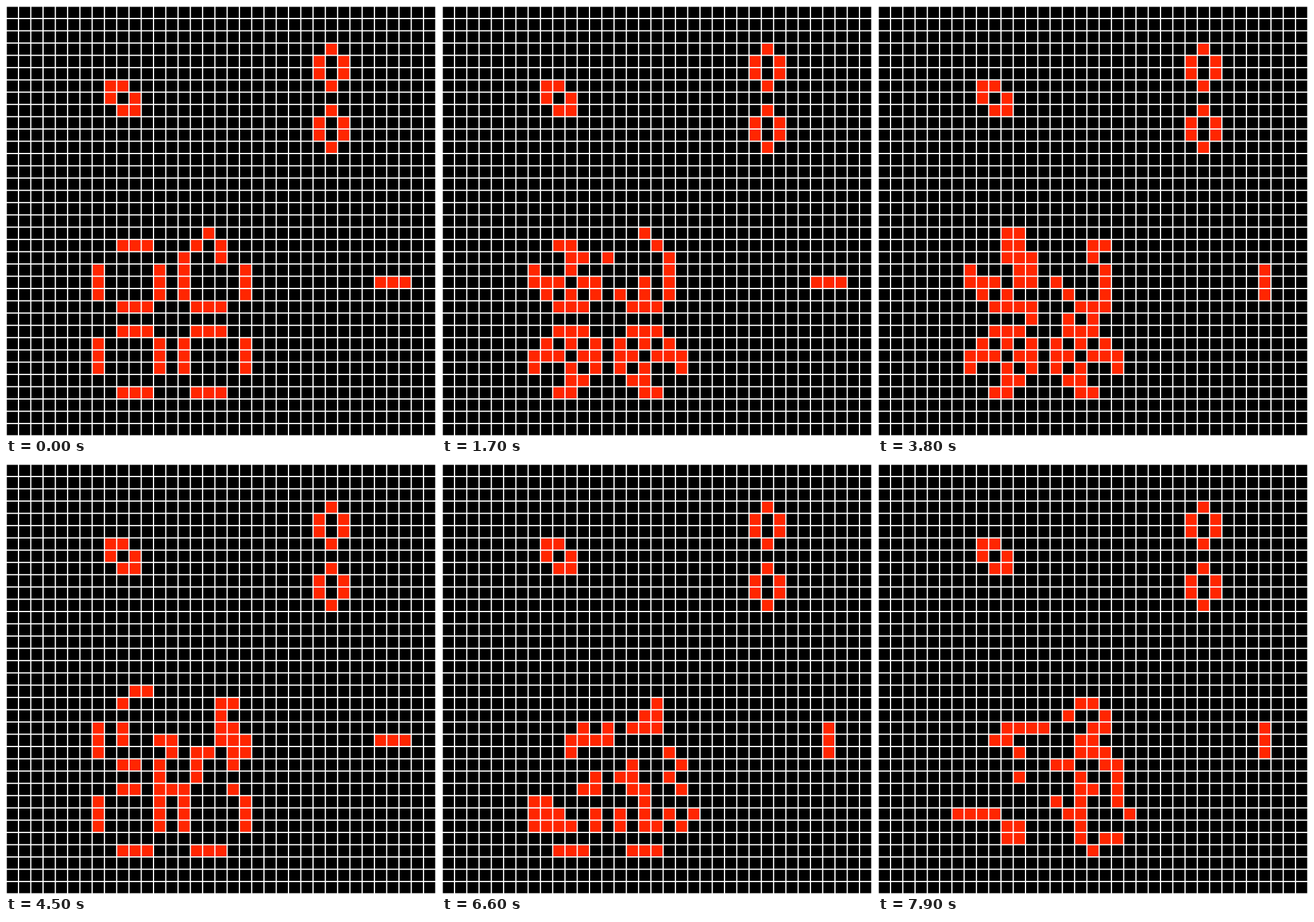
An HTML page with a canvas that plays this animation: 720x720 px, repeating every 8 s.

```html
<!DOCTYPE html>
<html>
<head>
<meta charset="utf-8">
<title>Game of Life</title>
<style>
html, body { margin: 0; width: 100%; height: 100%; overflow: hidden; background: #000; }
canvas { display: block; }
</style>
</head>
<body>
<canvas id="stage" width="720" height="720"></canvas>
<script>
const N = 35, PITCH = 20.55, EDGE = 0.4;
const LOOP = 8000, STEP = 680, LEAD = 160;
const ctx = document.getElementById('stage').getContext('2d');

const emptyGrid = () => Array.from({ length: N }, () => new Uint8Array(N));

function place(grid, col, row, pattern) {
  pattern.split('/').forEach((line, y) =>
    [...line].forEach((c, x) => { if (c === 'O') grid[row + y][col + x] = 1; }));
}

function next(grid) {
  const out = emptyGrid();
  for (let y = 0; y < N; y++) {
    for (let x = 0; x < N; x++) {
      let count = -grid[y][x];
      for (let dy = -1; dy <= 1; dy++)
        for (let dx = -1; dx <= 1; dx++)
          count += grid[(y + dy + N) % N][(x + dx + N) % N];
      out[y][x] = count === 3 || (count === 2 && grid[y][x]) ? 1 : 0;
    }
  }
  return out;
}

const beehive = '.O./O.O/O.O/.O.';
const bars = 'O....O.O....O', caps = '..OOO...OOO..';
const start = emptyGrid();
place(start, 8, 6, 'OO./O.O/.OO');
place(start, 25, 3, beehive);
place(start, 25, 8, beehive);
place(start, 30, 22, 'OOO');
// A pulsar whose upper right arm has been disturbed
place(start, 7, 18, [
  '.........O...', '..OOO...O.O..', '.......O..O..',
  bars, bars, bars, caps, '', caps, bars, bars, bars, '', caps
].join('/'));

const generations = [start];
while (generations.length <= (LOOP + LEAD) / STEP)
  generations.push(next(generations[generations.length - 1]));

const at = i => EDGE + i * PITCH;

function draw(grid) {
  ctx.fillStyle = '#000';
  ctx.fillRect(0, 0, 720, 720);
  ctx.fillStyle = '#ff2600';
  grid.forEach((line, y) => line.forEach((alive, x) => {
    if (alive) ctx.fillRect(at(x), at(y), PITCH, PITCH);
  }));
  ctx.fillStyle = '#fff';
  for (let i = 0; i <= N; i++) {
    ctx.fillRect(at(i) - 1, 0, 2, 720);
    ctx.fillRect(0, at(i) - 1, 720, 2);
  }
}

const begin = performance.now();
function tick() {
  const t = (performance.now() - begin) % LOOP;
  draw(generations[Math.floor((t + LEAD) / STEP)]);
  requestAnimationFrame(tick);
}
tick();
</script>
</body>
</html>
```
